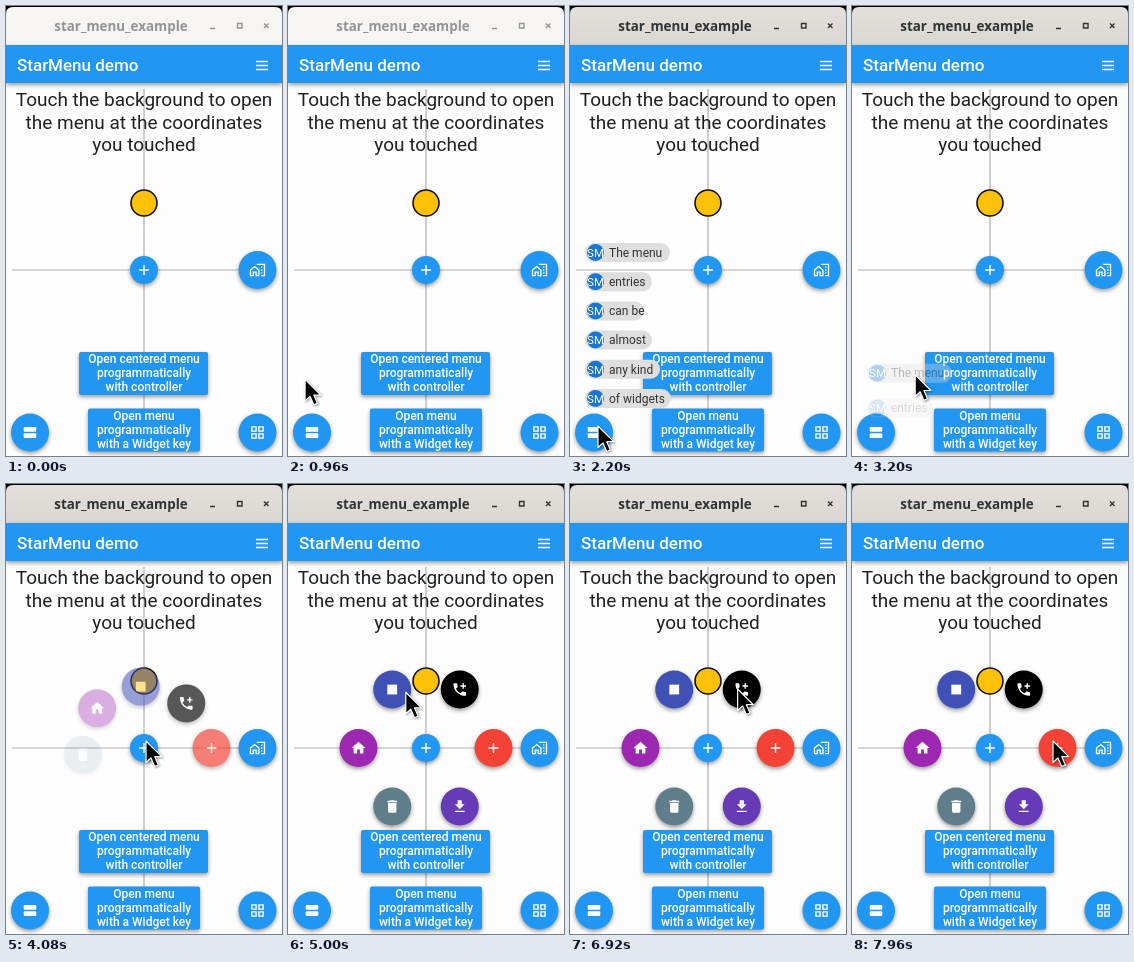
Recreate the animation shown at these times as an HTML page. Size 276 by 450 pixels, loop 8000 ms.

```html
<!DOCTYPE html>
<html lang="en">
<head>
<meta charset="utf-8">
<title>StarMenu demo</title>
<style>
  html, body { margin: 0; width: 100%; height: 100%; overflow: hidden; background: #fdfdfd; }
  svg { display: block; width: 276px; height: 450px; font-family: Roboto, sans-serif; }
  .mid { text-anchor: middle; }
  .raised { filter: drop-shadow(0 2px 2px #0006); }
  .label { font-size: 12px; font-weight: 500; fill: #fff; }
</style>
</head>
<body>
<svg id="stage" viewBox="0 0 276 450">
  <defs>
    <linearGradient id="active" x2="0" y2="1">
      <stop stop-color="#e3dfdb"/><stop offset="1" stop-color="#dad6d2"/>
    </linearGradient>
  </defs>
  <rect width="276" height="30"/>
  <path id="bar" d="M0 40V8Q0 1 7 1H269Q276 1 276 8V40Z"/>
  <g id="title">
    <text x="115" y="25" class="mid" font-family="Noto Sans, sans-serif" font-size="13.4" font-weight="700">star_menu_example</text>
    <path d="M204 22.5h5M231.5 17.500h4.500v4.500h-4.500zM258 17.500l4.500 4.500m0-4.500l-4.500 4.500" fill="none" stroke-width="1.400"/>
  </g>
  <rect y="77" width="276" height="373" fill="#fdfdfd"/>
  <rect y="39" width="276" height="38" fill="#2196f3" class="raised"/>
  <text x="11" y="64.500" font-size="17" font-weight="500" fill="#fff">StarMenu demo</text>
  <path d="M250 55.500h12m-12 4h12m-12 4h12" stroke="#fff" stroke-width="1.400"/>
  <path d="M138 83V446M6 264H270" stroke="#b0b0b0" stroke-width="1.200"/>
  <g class="mid" font-size="19" fill="#212121">
    <text x="138" y="100">Touch the background to open</text>
    <text x="138" y="122.500">the menu at the coordinates</text>
    <text x="138" y="145">you touched</text>
  </g>
  <circle cx="138" cy="197" r="13" fill="#ffc107" stroke="#111" stroke-width="1.600"/>
  <g id="page"></g>
  <g id="chips"></g>
  <g id="ring"></g>
  <path id="cursor" d="M0 0V21.500L5 17L8.700 25.500L12.400 24L8.800 15.700H15.700Z" stroke="#fff" stroke-width="1.200" stroke-linejoin="round" style="filter:drop-shadow(1px 1px 1px #0006)"/>
</svg>
<script>
const $ = id => document.getElementById(id);
const clamp = v => Math.max(0, Math.min(1, v));
const easeOut = v => 1 - (1 - v) ** 3;

// Icons on a 24-unit grid
const icons = {
  add: '<path d="M19 13h-6v6h-2v-6H5v-2h6V5h2v6h6z"/>',
  call: '<path d="M20 15.5c-1.25 0-2.45-.2-3.57-.57-.35-.11-.74-.03-1.02.24l-2.2 2.2c-2.83-1.44-5.15-3.75-6.59-6.58l2.2-2.21c.28-.27.36-.66.25-1.01C8.7 6.45 8.5 5.25 8.5 4c0-.55-.45-1-1-1H4c-.55 0-1 .45-1 1 0 9.39 7.61 17 17 17 .55 0 1-.45 1-1v-3.5c0-.55-.45-1-1-1zM21 6h-3V3h-2v3h-3v2h3v3h2V8h3z"/>',
  square: '<path d="M5 5h14v14H5z"/>',
  home: '<path d="M10 20v-6h4v6h5v-8h3L12 3 2 12h3v8z"/>',
  trash: '<path d="M6 19c0 1.1.9 2 2 2h8c1.1 0 2-.9 2-2V7H6zM19 4h-3.5l-1-1h-5l-1 1H5v2h14z"/>',
  save: '<path d="M19 9h-4V3H9v6H5l7 7 7-7zM5 18v2h14v-2z"/>',
  rows: '<rect x="3" y="4" width="18" height="7" rx="1.500"/><rect x="3" y="13" width="18" height="7" rx="1.500"/>',
  grid: '<path d="M4 4h6v6H4zM14 4h6v6h-6zM4 14h6v6H4zM14 14h6v6h-6z" fill="none" stroke="#fff" stroke-width="2"/>',
  work: '<path d="M2 20v-8l6-5 6 5v8h-4v-5H6v5zM11 4h11v16h-5M17 8h2m-2 4h2m-2 4h2" fill="none" stroke="#fff" stroke-width="1.900"/>'
};

const disc = (x, y, r, color, icon) =>
  `<g transform="translate(${x} ${y})"><circle r="${r}" fill="${color}" class="raised"/>
   <g transform="scale(.7) translate(-12 -12)" fill="#fff">${icons[icon]}</g></g>`;

const button = (x, y, w, lines) =>
  `<rect x="${x}" y="${y}" width="${w}" height="43" rx="2" fill="#2196f3" class="raised"/>` +
  lines.map((s, i) => `<text class="label mid" x="138" y="${y + 11 + i * 14.2}">${s}</text>`).join('');

const blue = '#2196f3';
$('page').innerHTML =
  button(73, 346, 129, ['Open centered menu', 'programmatically', 'with controller']) +
  button(82, 402.5, 112, ['Open menu', 'programmatically', 'with a Widget key']) +
  disc(138, 264, 14, blue, 'add') + disc(251.5, 264, 19, blue, 'work') +
  disc(24, 426.5, 19, blue, 'rows') + disc(251.5, 426.5, 19, blue, 'grid');

const chipData = [['The menu', 100], ['entries', 82], ['can be', 74], ['almost', 82], ['any kind', 90], ['of widgets', 101]];
$('chips').innerHTML = chipData.map(([s, right]) =>
  `<g><rect x="15" y="-9.500" width="${right - 15}" height="19" rx="9.500" fill="#dedede"/>
   <circle cx="25.500" r="8.500" fill="#1976d2"/>
   <text class="mid" x="25.500" y="4.200" font-size="11.500" fill="#fff">SM</text>
   <text x="39" y="4.200" font-size="12" fill="#333">${s}</text></g>`).join('');

const ringData = [['#f44336', 'add'], ['#000', 'call'], ['#3f51b5', 'square'], ['#9c27b0', 'home'], ['#607d8b', 'trash'], ['#673ab7', 'save']];
$('ring').innerHTML = ringData.map(([color, icon]) => `<g>${disc(0, 0, 19, color, icon)}</g>`).join('');

// Pointer path: time, x, y
const path = [
  [240, 278, 111], [880, 9, 340], [960, 17, 373], [1040, 21, 401], [1180, 28, 420],
  [3000, 28, 420], [3640, 140, 257], [4480, 140, 257], [4800, 129, 228], [5000, 118, 208],
  [5240, 62, 258], [5500, 98, 343], [5760, 170, 338], [5920, 206, 262], [6080, 172, 202],
  [6220, 104, 203], [6440, 58, 262], [6600, 100, 344], [6760, 165, 335], [6920, 168, 205],
  [7080, 108, 208], [7320, 66, 258], [7540, 98, 343], [7740, 165, 338], [7960, 201, 257], [8000, 201, 257]
];

function pointer(t) {
  const i = Math.max(1, path.findIndex(p => p[0] > t));
  const [a, x, y] = path[i - 1], [b, x2, y2] = path[i];
  const k = clamp((t - a) / (b - a));
  return [x + (x2 - x) * k, y + (y2 - y) * k];
}

function place(el, x, y, opacity = 1) {
  el.setAttribute('transform', `translate(${x} ${y})`);
  el.setAttribute('opacity', opacity);
}

function draw(t) {
  const focused = t >= 1200;
  $('bar').setAttribute('fill', focused ? 'url(#active)' : '#f6f5f4');
  const ink = focused ? '#2e3436' : '#929595';
  $('title').setAttribute('fill', ink);
  $('title').setAttribute('stroke', 'none');
  $('title').lastElementChild.setAttribute('stroke', ink);

  [...$('chips').children].forEach((el, i) => {
    const open = easeOut(clamp((t - 1280 - i * 100) / 420));
    const shut = clamp((t - 2840 - (5 - i) * 40) / 240);
    const k = open * (1 - shut);
    place(el, 0, 426.5 + (246.5 + i * 29.2 - 426.5) * k, k);
  });

  // Items swing into place, later ones lagging behind
  const lag = clamp((4360 - t) / 400) / .7;
  [...$('ring').children].forEach((el, i) => {
    const angle = (i * 60 - 13.5 * i * lag) * Math.PI / 180;
    const r = 67.5 * (i ? 1 - .09 * lag : 1);
    const opacity = clamp((t - 3920) / 235 - .036 * i * i);
    place(el, 138 + r * Math.cos(angle), 264 - r * Math.sin(angle), opacity);
  });

  place($('cursor'), ...pointer(t), t < 240 ? 0 : 1);
}

function frame() {
  draw(performance.now() % 8000);
  requestAnimationFrame(frame);
}
frame();
</script>
</body>
</html>
```
